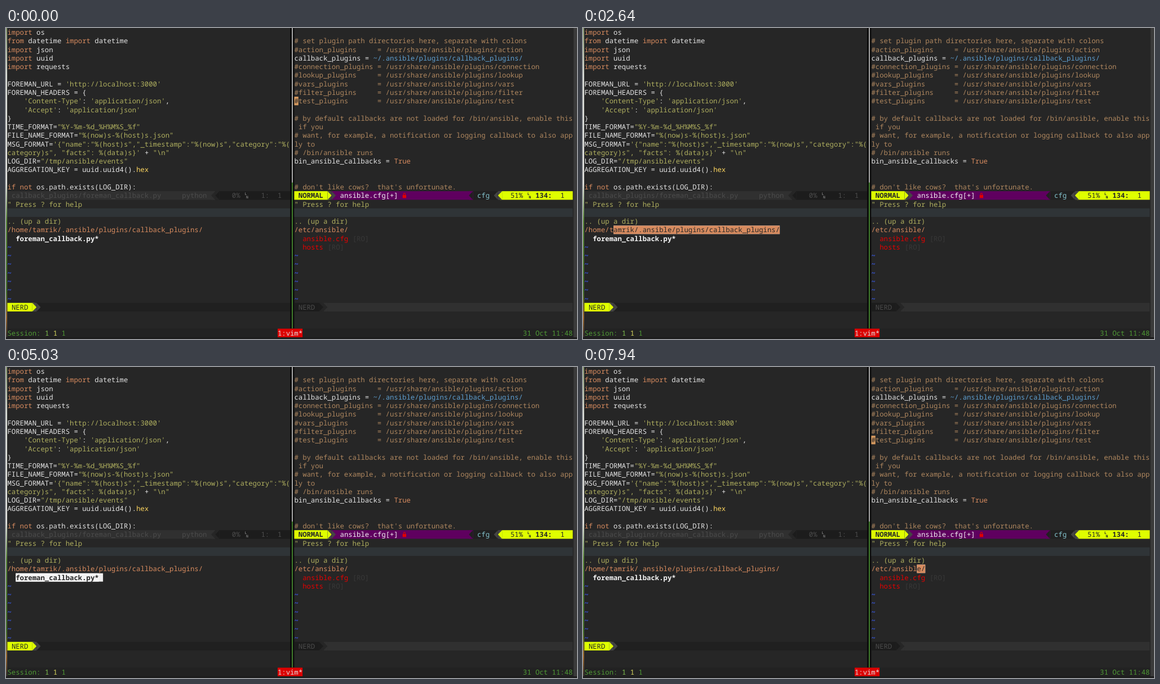
An HTML page for the animation above (8 s loop, 1013 by 553 pixels).

```html
<!DOCTYPE html>
<html lang="en">
<head>
<meta charset="utf-8">
<title>Terminal with split editor</title>
<style>
  html, body { margin: 0; width: 100%; height: 100%; overflow: hidden; background: #262626; }
  #stage { position: relative; width: 1013px; height: 553px; overflow: hidden; background: #262626; }
  #stage div, #stage span { position: absolute; white-space: pre; }
  /* The grid has whole 14 x 29 cells and is scaled down as one piece. */
  #term {
    left: 0; top: 0; width: 1904px; height: 1044px;
    transform-origin: 0 0; transform: translate(2.5px, -0.1px) scale(0.52679);
    font: 23.333px/29px "Noto Sans Mono", "DejaVu Sans Mono", monospace;
    text-rendering: geometricPrecision; font-variant-ligatures: none;
  }
  .edge-l { left: 0; top: 0; width: 2px; height: 553px;
    background: linear-gradient(#8a9a70, #dfe3dc 15%, #e8e8e4 50%, #5c8a3c 62%, #44702e 85%, #a06a30 93%, #303030); }
  .edge-r { left: 1007px; top: 0; width: 6px; height: 553px; background: #3a3a3a; }
  .edge-b { left: 0; top: 550px; width: 1013px; height: 3px; background: #1c1c1c; }
  .bold { font-weight: 700; }
  .ln { font-size: 12px; line-height: 13px; font-weight: 700; }
</style>
</head>
<body>
<div id="stage">
  <div class="edge-l"></div>
  <div class="edge-r"></div>
  <div class="edge-b"></div>
  <div id="term"></div>
</div>
<script>
const W = 14, H = 29, COLS = 136, MID = 69, LOOP = 8000;
const BG = '#262626', LIME = '#dfff00', GREY = '#444444', PURPLE = '#5f005f';
const GREEN = '#4f9a35', LIGHT = '#eeeeee', DARK = '#0c0c0c';
const INK = {
  o: '#d78b5f', w: '#e4e4e4', s: '#afaf5f', c: '#af875f', b: '#5f9fd0', y: '#ffd75f',
  t: '#3a5cf0', r: '#e60000', d: '#383838', i: '#4c4c4c', k: '#262626', g: GREEN,
  a: '#85c5cf', m: '#f4f4f4', n: '#d7d75f', e: '#7fc04f'
};
const term = document.getElementById('term');

function add(tag, css, text = '', cls = '', parent = term) {
  const el = document.createElement(tag);
  Object.assign(el.style, css);
  el.textContent = text;
  el.className = cls;
  return parent.appendChild(el);
}
const at = (row, col) => ({ left: col * W + 'px', top: row * H + 'px' });
const box = (left, top, width, height, css, parent) =>
  add('div', { left: left + 'px', top: top + 'px', width: width + 'px', height: height + 'px', ...css }, '', '', parent);
const block = (row, col, cols, background, parent) =>
  box(col * W, row * H, cols * W, H, { background }, parent);

// Each part is an ink key followed by its text; a leading * makes it bold.
function line(row, col, ...parts) {
  for (let part of parts) {
    const bold = part[0] === '*';
    if (bold) part = part.slice(1);
    const text = part.slice(1), color = INK[part[0]], cls = bold ? 'bold' : '';
    add('span', { ...at(row, col), color }, text, cls);
    const layer = inverse[row];
    if (layer) {
      block(0, col, text.length, color, layer);
      add('span', { ...at(0, col), color: BG }, text, cls, layer);
    }
    col += text.length;
  }
}

function arrow(row, col, color, back, dir) {
  const cell = block(row, col, 1, back);
  const shape = dir > 0 ? '0 0, 100% 50%, 0 100%' : '100% 0, 0 50%, 100% 100%';
  add('div', { inset: '0', background: color, clipPath: `polygon(${shape})` }, '', '', cell);
}

function lineMark(row, col, color) {
  const cell = add('div', { ...at(row, col), color });
  add('span', { left: '1px', top: '2px' }, 'L', 'ln', cell);
  add('span', { left: '6px', top: '13px' }, 'N', 'ln', cell);
}

const rule = (top, height, background, parent) =>
  box(68.5 * W - 1, top, 3, height, { background }, parent);

// Inverted copies of the rows that can be selected, clipped to the selection.
const inverse = {};
for (const row of [23, 24, 25]) {
  const layer = inverse[row] = block(row, 0, COLS, LIGHT);
  layer.style.zIndex = 2;
  block(0, 68, 1, GREEN, layer);
  rule(0, H, DARK, layer);
}

// Pane border and cursor lines
box(68 * W, 0, W, 35 * H, { background: DARK });
rule(0, 18 * H, '#d0d0d0');
rule(18 * H, 17 * H, GREEN);
block(21, 0, 68, '#2f3437');
block(21, MID, 67, '#2f3437');

// Left editor
line(0, 0, 'oimport', 'w os');
line(1, 0, 'ofrom', 'w datetime ', 'oimport', 'w datetime');
['json', 'uuid', 'requests'].forEach((name, i) => line(2 + i, 0, 'oimport', 'w ' + name));
line(6, 0, 'wFOREMAN_URL = ', "s'http://localhost:3000'");
line(7, 0, 'wFOREMAN_HEADERS = {');
line(8, 4, "s'Content-Type'", 'w: ', "s'application/json'", 'w,');
line(9, 4, "s'Accept'", 'w: ', "s'application/json'");
line(10, 0, 'w}');
line(11, 0, 'wTIME_FORMAT=', 's"%Y-%m-%d_%H%M%S_%f"');
line(12, 0, 'wFILE_NAME_FORMAT=', 's"%(now)s-%(host)s.json"');
line(13, 0, 'wMSG_FORMAT=', 's\'{"name":"%(host)s","_timestamp":"%(now)s","category":"%(');
line(14, 0, 'scategory)s", "facts": %(data)s}\'', 'w + ', 's"\\n"');
line(15, 0, 'wLOG_DIR=', 's"/tmp/ansible/events"');
line(16, 0, 'wAGGREGATION_KEY = uuid.uuid4().', 'yhex');
line(18, 0, 'oif not', 'w os.path.exists(LOG_DIR):');

// Right editor
line(1, MID, 'c# set plugin path directories here, separate with colons');
['action', '', 'connection', 'lookup', 'vars', 'filter', 'test'].forEach((kind, i) => {
  if (kind) line(2 + i, MID, 'c' + `#${kind}_plugins`.padEnd(20) + '= /usr/share/ansible/plugins/' + kind);
});
line(3, MID, 'wcallback_plugins = ', 'b~/.ansible/plugins/callback_plugins/');
line(10, MID, 'c# by default callbacks are not loaded for /bin/ansible, enable this');
line(11, MID, 'c if you');
line(12, MID, 'c# want, for example, a notification or logging callback to also app');
line(13, MID, 'cly to');
line(14, MID, 'c# /bin/ansible runs');
line(15, MID, 'wbin_ansible_callbacks = ', 'oTrue');
line(18, MID, "c# don't like cows?  that's unfortunate.");

// Status bar, inactive
block(19, 0, 50, '#303030');
block(19, 50, 18, '#1c1c1c');
arrow(19, 49, '#262626', '#303030', -1);
arrow(19, 50, '#1c1c1c', '#262626', -1);
line(19, 1, 'icallback_plugins/foreman_callback.py');
line(19, 42, 'ipython');
line(19, 54, 'i0%');
lineMark(19, 57, '#777');
line(19, 61, 'i1:  1');

// Status bar, active
block(19, MID, 8.5, LIME);
block(19, 78, 34, PURPLE);
block(19, 111.5, 6, '#202020');
block(19, 118.5, 17.5, LIME);
arrow(19, 77, LIME, GREY, 1);
arrow(19, 78, GREY, PURPLE, 1);
arrow(19, 111, '#202020', PURPLE, -1);
arrow(19, 117, GREY, '#202020', -1);
arrow(19, 118, LIME, GREY, -1);
line(19, 70, '*kNORMAL');
line(19, 80, 'mansible.cfg[+]');
line(19, 113, 'acfg');
line(19, 121, 'k51%');
lineMark(19, 125, BG);
line(19, 127, '*k134:', 'k  1');
const lock = add('div', at(19, 95));
box(3, 6, 4, 8, { border: '2px solid #e00000', borderRadius: '5px 5px 0 0' }, lock);
box(1, 13, 12, 10, { background: '#e00000' }, lock);

// File trees
for (const col of [0, MID]) {
  line(20, col, 's" Press ? for help');
  line(22, col, 's.. (up a dir)');
  for (let row = col ? 26 : 25; row < 32; row++) line(row, col, '*t~ ');
}
line(23, 0, 'o/home/tamrik/.ansible/plugins/callback_plugins/');
line(24, 2, '*mforeman_callback.py*');
line(23, MID, 'o/etc/ansible/');
line(24, 71, 'ransible.cfg ', 'd[RO]');
line(25, 71, 'rhosts ', 'd[RO]');

// Tree status bars
block(32, 7, 61, '#202020');
block(32, 0, 6.5, LIME);
arrow(32, 6, LIME, GREY, 1);
arrow(32, 7, GREY, '#202020', 1);
line(32, 1, 'kNERD');
block(32, 76, 60, '#303030');
block(32, MID, 6.5, '#1c1c1c');
arrow(32, 75, '#1c1c1c', '#262626', 1);
arrow(32, 76, '#262626', '#303030', 1);
line(32, 70, 'iNERD');

// Session bar
block(35, 0, COLS, '#222222');
block(35, 65, 6, '#dc0000');
line(35, 0, 'gSession: ', 'e1 ', 'n1 ', 'g1');
line(35, 65, 'w1:vim*');
line(35, 124, 'g31 Oct 11:48');

const cursor = block(8, MID, 1, '#d79a5f');
add('span', { left: '0', top: '0', color: BG }, '#', '', cursor);

// Selection steps: time, first cell, end cell
const cell = (row, col) => row * COLS + col;
const steps = [[0, 0, 0]];
function drag(start, gap, row, end, cols) {
  cols.forEach((col, i) => steps.push([start + i * gap, cell(row, col), cell(row, end)]));
}
drag(1610, 51, 23, 47, [46, 43, 38, 32, 26, 21, 18, 15, 13, 12, 11]);
drag(2270, 50, 23, 47, [10, 9]);
drag(2530, 73.7, 23, 47, [8, 7, 6, 5, 4, 3, 2, 1, 0]);
drag(4250, 50, 24, 23, [22, 21, 20, 18, 16, 15]);
drag(4550, 68.5, 24, 23, [14, 12, 10, 8, 6, 4, 3, 2]);
drag(5080, 50, 24, 23, [1]);
steps.push([5130, cell(24, 23), cell(25, 1)], [5180, cell(24, 23), cell(25, 2)]);
drag(5520, 50, 24, 23, [1]);
drag(7890, 50, 23, 82, [81, 80]);

const blinks = [50, 590, 1200, 1790, 2320, 2930, 3470, 4060, 4650, 5180, 5730, 6330, 6950, 7540];

function draw(t) {
  const [, from, to] = steps.filter(s => s[0] <= t).pop();
  for (const row in inverse) {
    const clamp = v => Math.max(0, Math.min(COLS, v - row * COLS));
    const a = clamp(from), b = clamp(to), style = inverse[row].style;
    style.visibility = a < b ? 'visible' : 'hidden';
    style.clipPath = `inset(0 ${(COLS - b) * W}px 0 ${a * W}px)`;
  }
  const flips = blinks.filter(b => b <= t).length;
  cursor.style.visibility = flips % 2 ? 'hidden' : 'visible';
}

const begin = performance.now();
function tick() {
  draw((performance.now() - begin) % LOOP);
  requestAnimationFrame(tick);
}
tick();
</script>
</body>
</html>
```
